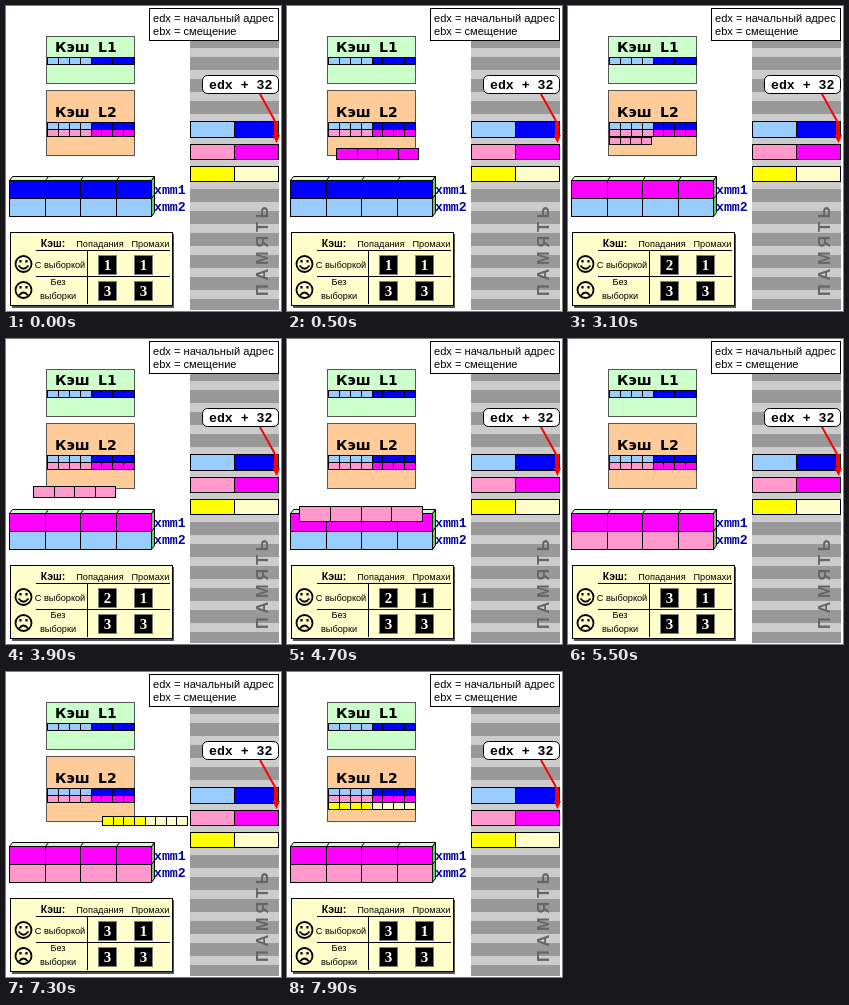
Write an HTML page that moves like this. It is 275 by 305 pixels and loops after 8900 ms.

```html
<!DOCTYPE html>
<html lang="ru">
<head>
<meta charset="utf-8">
<style>
  html, body { margin: 0; width: 100%; height: 100%; overflow: hidden; background: #fff; }
  svg { display: block; width: 275px; height: 305px; font-family: "Liberation Sans", sans-serif; }
  rect, .crisp { shape-rendering: crispEdges; }
  .box { stroke: #000; }
  .soft { stroke: #555; }
  .title { font: bold 14px "DejaVu Sans", sans-serif; }
  .note { font-size: 11.1px; }
  .mono { font: bold 13.2px "Liberation Mono", monospace; }
  .small { font-size: 9.2px; }
  .digit { font: bold 15px "Liberation Serif", serif; fill: #fff; }
  .mid { text-anchor: middle; }
</style>
</head>
<body>
<svg viewBox="0 0 275 305">
  <g id="stripes" fill="#ccc"><rect x="184" y="35" width="89" height="269" fill="#999"/></g>
  <text transform="translate(262 290) rotate(-90)" font-size="16.3" font-weight="bold" letter-spacing="3.8" fill="#666">ПАМЯТЬ</text>

  <rect class="box" x="143.5" y="2.5" width="129" height="32" fill="#fff"/>
  <text class="note" x="147" y="16">edx = начальный адрес</text>
  <text class="note" x="147" y="29">ebx = смещение</text>

  <rect class="soft" x="40.5" y="30.5" width="88" height="47" fill="#cfc"/>
  <text class="title" x="49" y="46">Кэш</text><text class="title" x="92" y="46">L1</text>
  <rect class="soft" x="40.5" y="84.5" width="88" height="65" fill="#fc9"/>
  <text class="title" x="49" y="111">Кэш</text><text class="title" x="92" y="111">L2</text>

  <g stroke="#000">
    <path d="M3.5 174.5l3-4h142l-3 4z" fill="#cfc"/>
    <path d="M145.5 174.5l3-4v36l-3 4z" fill="#6c6"/>
    <path d="M39.5 174.5l3-4M74.5 174.5l3-4M110.5 174.5l3-4M145.5 192.5l3-4" fill="none"/>
  </g>
  <g class="mono" fill="#0000a8"><text x="148" y="188">xmm1</text><text x="148" y="205">xmm2</text></g>

  <rect x="6" y="228" width="162" height="74" fill="#555"/>
  <rect class="box" x="4.5" y="226.5" width="162" height="73" fill="#ffc"/>
  <path class="crisp" d="M30 244.5H164M30 270.5H164M81.5 244V298" stroke="#000"/>
  <text class="mid" x="47" y="241" font-size="10.5" font-weight="bold">Кэш:</text>
  <g class="small mid">
    <text x="94" y="241">Попадания</text><text x="144.5" y="241">Промахи</text>
    <text x="54" y="262">С выборкой</text>
    <text x="52" y="279">Без</text><text x="52" y="293">выборки</text>
  </g>
  <g fill="none" stroke="#000" stroke-width="1.8">
    <circle cx="17.5" cy="258" r="8"/><path d="M12.5 259.5q5 6.5 10 0"/>
    <circle cx="17.5" cy="284" r="8"/><path d="M13 289.5q4.500-6 9 0"/>
  </g>
  <path d="M14.500 254v2.500M20.500 254v2.500M14.500 280v2.500M20.500 280v2.500" stroke="#000" stroke-width="2.2"/>

  <g id="scene"></g>

  <path d="M254 88L269 115" stroke="#f00" stroke-width="2"/>
  <path d="M268 115h4v14h2l-3.500 8-4-8h1.500z" fill="#f00"/>
  <rect class="box" x="196.5" y="69.5" width="76" height="18" rx="5" fill="#fff" style="shape-rendering:auto"/>
  <text class="mono" x="203" y="83">edx + 32</text>
  <g id="flying"></g>
</svg>
<script>
const LOOP = 8900;
const LIGHT = '#9cf', BLUE = '#00f', PINK = '#f9c', MAGENTA = '#f0f', YELLOW = '#ff0', CREAM = '#ffc';
const $ = id => document.getElementById(id);

// A row of n outlined cells; the first colour fills the left half, the second the right half.
function cells(x1, y1, x2, y2, n, left, right = left) {
  const edge = i => Math.round(x1 + (x2 - 1 - x1) * i / n);
  let out = '';
  for (let i = 0; i < n; i++)
    out += `<rect class="box" x="${edge(i) + .5}" y="${y1 + .5}" width="${edge(i + 1) - edge(i)}" height="${y2 - y1 - 1}" fill="${i < n / 2 ? left : right}"/>`;
  return out;
}

const digit = (x, y, n) =>
  `<rect x="${x - 8.5}" y="${y - 14.5}" width="18" height="19" stroke="#808080"/><text class="digit mid" x="${x + .5}" y="${y}">${n}</text>`;

// Each flight: start, step length, cell count, colours and the box at each step.
const flights = [
  { start: 100, step: 400, n: 4, colors: [MAGENTA],
    path: [[73, 132, 130, 141], [49, 142, 132, 154], [38, 154, 135, 168], [17, 168, 141, 184]] },
  { start: 3100, step: 400, n: 4, colors: [PINK],
    path: [[41, 131, 84, 139], [36, 138, 93, 147], [27, 147, 110, 159], [20, 156, 117, 170], [12, 167, 136, 183]] },
  { start: 6500, step: 200, n: 8, colors: [YELLOW, CREAM],
    path: [[175, 158, 262, 172], [156, 155, 243, 169], [133, 152, 220, 164], [116, 148, 203, 160],
           [96, 144, 182, 154], [77, 140, 163, 150], [61, 136, 147, 144]] }
];

function scene(t) {
  const hits = 1 + (t >= 2100) + (t >= 5500);
  return cells(41, 51, 129, 59, 8, LIGHT, BLUE)
    + cells(41, 116, 129, 124, 8, LIGHT, BLUE)
    + cells(41, 123, 129, 131, 8, PINK, MAGENTA)
    + (t >= 7900 ? cells(41, 130, 129, 138, 8, YELLOW, CREAM) : '')
    + cells(184, 115, 273, 132, 2, LIGHT, BLUE)
    + cells(184, 138, 273, 154, 2, PINK, MAGENTA)
    + cells(184, 160, 273, 176, 2, YELLOW, CREAM)
    + cells(3, 174, 146, 193, 4, t >= 1700 ? MAGENTA : BLUE)
    + cells(3, 192, 146, 211, 4, t >= 5100 ? PINK : LIGHT)
    + digit(101, 264, hits) + digit(137, 264, 1) + digit(101, 290, 3) + digit(137, 290, 3);
}

function flying(t) {
  return flights.map(f => {
    const box = f.path[Math.floor((t - f.start) / f.step)];
    return box ? cells(...box, f.n, ...f.colors) : '';
  }).join('');
}

for (let y = 42; y < 300; y += 22)
  $('stripes').innerHTML += `<rect x="184" y="${y}" width="89" height="9"/>`;

const begin = performance.now();
let shown;
function draw() {
  const t = (performance.now() - begin) % LOOP;
  const tick = Math.floor(t / 100);
  if (tick !== shown) {
    shown = tick;
    $('scene').innerHTML = scene(t);
    $('flying').innerHTML = flying(t);
  }
  requestAnimationFrame(draw);
}
draw();
</script>
</body>
</html>
```
